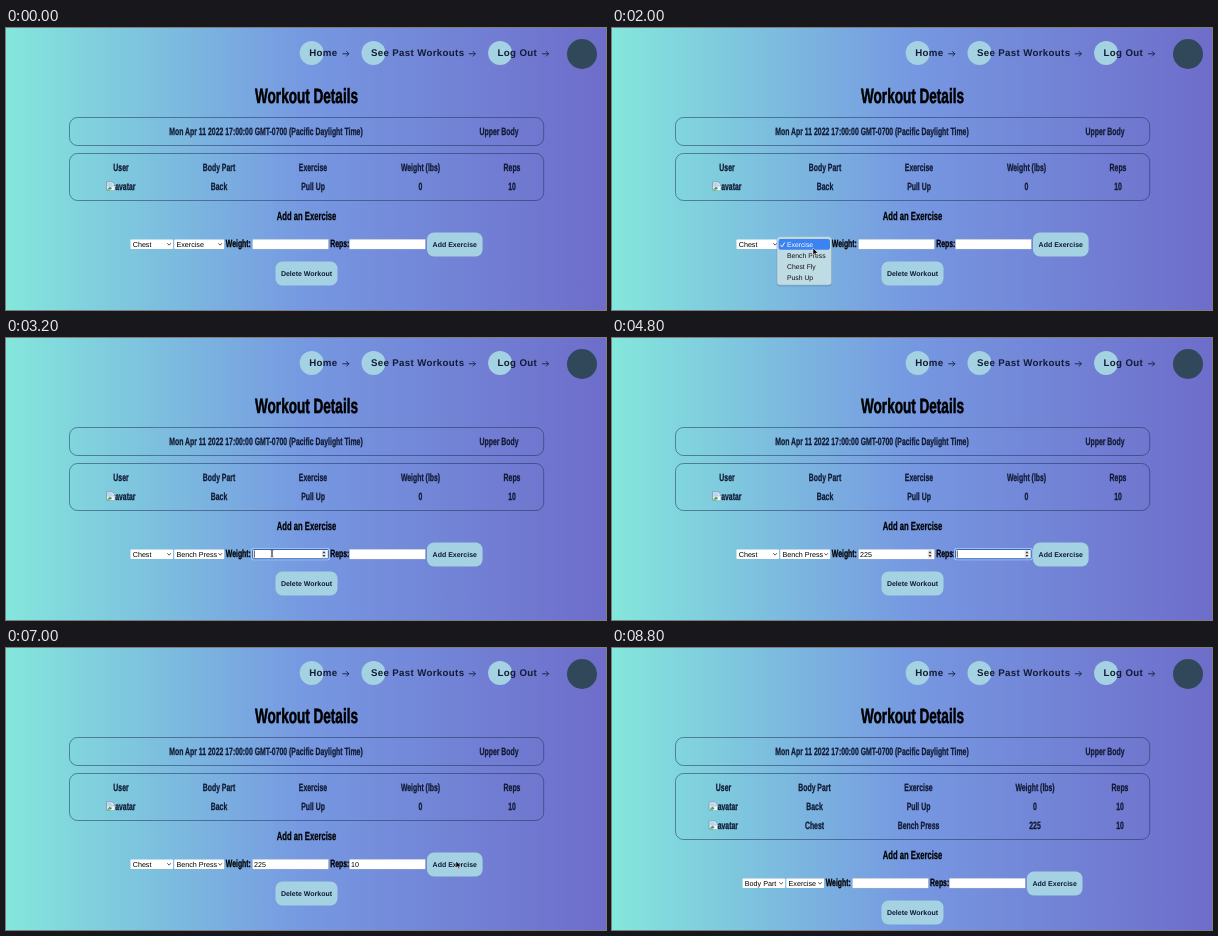
Recreate the animation shown at these times as an HTML page. Size 600x282 px, loop 8900 ms.

```html
<!DOCTYPE html>
<html lang="en">
<head>
<meta charset="utf-8">
<title>Workout Details</title>
<style>
  html, body { margin: 0; width: 100%; height: 100%; overflow: hidden; }
  body { background: linear-gradient(to right, #84e7dc, #7698e1 50%, #6e6dca); }
  svg { display: block; width: 100%; height: 100%; }
  text { font-family: "Liberation Sans", Arial, sans-serif; fill: #000; white-space: pre; text-rendering: geometricPrecision; }
  .narrow { font-weight: bold; font-size: 10.5px; stroke: #000; stroke-width: .3; }
  .cell { fill: #121b35; stroke: #121b35; }
  .title { font-size: 20.7px; stroke-width: .6; }
  .subtitle { font-size: 11.7px; }
  .nav { font-weight: bold; font-size: 9.7px; letter-spacing: .34px; fill: #121b35; }
  .button { font-weight: bold; font-size: 7px; fill: #101a33; text-anchor: middle; }
  .control { font-size: 7.2px; }
  .value { font-size: 7.1px; }
  .option { font-size: 6.8px; }
  .soft { fill: #a4d2e3; }
  .frame { fill: none; stroke: #1c2f55; stroke-width: .6; stroke-opacity: .85; }
  .line { fill: none; stroke: #17213d; stroke-width: .9; }
</style>
</head>
<body>
<svg id="stage" viewBox="0 0 600 282" preserveAspectRatio="none"></svg>
<script>
const LOOP = 8900, STEP = 100;
const SUBMITTED = 7100;

// Condensed display face: one width factor for every heading and cell.
const narrow = (x, y, str, cls = 'cell', anchor = 'middle') =>
  `<text class="narrow ${cls}" text-anchor="${anchor}" transform="translate(${x} ${y}) scale(.655 1)">${str}</text>`;
const text = (x, y, str, cls, extra = '') => `<text x="${x}" y="${y}" class="${cls}" ${extra}>${str}</text>`;
const rect = (x, y, w, h, r, attrs) => `<rect x="${x}" y="${y}" width="${w}" height="${h}" rx="${r}" ${attrs}/>`;

const navLink = (x, label, arrowX) => `
  <circle class="soft" cx="${x + 2.5}" cy="25" r="12"/>
  ${text(x, 28.3, label, 'nav')}
  <path class="line" d="M${arrowX} 25.8h6.6m-2.6-2.6l2.6 2.6l-2.6 2.6"/>`;

const avatar = (x, y) => `
  <g transform="translate(${x - 14.8} ${y - 8.6})">
    <path d="M.4.4h5.4l2.6 2.5v5.8h-8z" fill="#e9f1fb" stroke="#7d8794" stroke-width=".7"/>
    <path d="M1 1h4.6v2.2h2.2v2h-6.8z" fill="#b9d3f6"/>
    <path d="M1 8.2l2.6-3l4 3z" fill="#54a548"/>
    <path d="M8.4 4.4l-4.4 4.4h4.4z" fill="#f4f7fb"/>
  </g>
  ${narrow(x + 4.3, y, 'avatar')}`;

const table = (cols, rows) => {
  const headings = ['User', 'Body Part', 'Exercise', 'Weight (lbs)', 'Reps'];
  const body = rows.map((row, i) => {
    const y = 162 + 19 * i;
    return avatar(cols[0], y) + row.map((v, c) => narrow(cols[c + 1], y, v)).join('');
  });
  return rect(63.5, 125.5, 474.2, 28 + 19 * rows.length, 8, 'class="frame"')
    + headings.map((h, c) => narrow(cols[c], 143, h)).join('') + body.join('');
};

const select = (x, w, label, id = '') => rect(x, 211.5, w, 9.6, .8, 'fill="#fff"')
  + text(x + 2.2, 218.9, label, 'control', id)
  + `<path d="M${x + w - 5.8} 215.2l1.8 2l1.8-2" fill="none" stroke="#333" stroke-width=".8"/>`;

const input = x => rect(x, 211.2, 76, 9.9, 0, 'fill="#fff" stroke="#8f9bb0" stroke-width=".3"');

const button = (x, y, w, label) => rect(x, y, w, 24, 7, 'class="soft"')
  + text(x + w / 2, y + 14.3, label, 'button');

const form = (x, part, exerciseWidth, id) => {
  const after = x + 43.7 + exerciseWidth;
  return narrow(300.5, 192, 'Add an Exercise', 'subtitle')
    + select(x, 42.6, part) + select(x + 43.7, exerciseWidth, 'Exercise', id)
    + narrow(after + 1.6, 219, 'Weight:', '', 'start') + input(after + 28.3)
    + narrow(after + 106, 219, 'Reps:', '', 'start') + input(after + 125.2)
    + button(after + 202.8, 204.5, 55.6, 'Add Exercise')
    + button(269.5, 233.5, 62, 'Delete Workout');
};

const focusable = (id, x) => `
  <g id="${id}Ring">
    ${rect(x - .6, 210.6, 77.2, 11, 1.8, 'fill="#fff" stroke="#a9ccf7" stroke-width="1.4"')}
    ${rect(x + .2, 211.4, 75.6, 9.4, 1, 'fill="#fff" stroke="#1f55b4" stroke-width="1"')}
  </g>
  <g id="${id}Spin">
    ${rect(x + 69.2, 211.9, 4.6, 8.4, 1.4, 'fill="#e6e6e8"')}
    <path d="M${x + 70} 215.2l1.5-1.9l1.5 1.9zM${x + 70} 217l1.5 1.9l1.5-1.9z" fill="#333"/>
  </g>
  ${text(x + 1.6, 218.7, '', 'value', `id="${id}Text"`)}
  <path id="${id}Caret" d="M0 212.6v7" stroke="#111" stroke-width=".6"/>`;

const options = ['Exercise', 'Bench Press', 'Chest Fly', 'Push Up'];
const menu = `<g id="menu">
  ${rect(164.6, 209.6, 55.4, 49, 3.5, 'fill="#1c2c50" opacity=".16"')}
  ${rect(165, 208.6, 54.6, 48.4, 3, 'fill="#bfdbe3" stroke="#8fa9bd" stroke-width=".5"')}
  ${rect(166.6, 0, 51.4, 10.8, 2, 'id="highlight" fill="#3b83f3"')}
  <path id="check" d="M168.6 216.8l1.5 2l2.6-4.3" fill="none" stroke-width=".9"/>
  ${options.map((o, i) => text(175, 219 + 11 * i, o, 'option', `data-row="${i}"`)).join('')}
</g>`;

const pointer = `
  <path id="arrow" d="M0 0v7l1.6-1.5l1.1 2.5l1.1-.5l-1.1-2.4h2.2z" fill="#000" stroke="#fff" stroke-width=".5"/>
  <path id="beam" d="M-1.4-3.4q1.4 0 1.4 1v4.8q0 1-1.4 1M1.4-3.4q-1.4 0-1.4 1v4.8q0 1 1.4 1" fill="none" stroke="#222" stroke-width=".7"/>`;

const stage = document.getElementById('stage');
stage.innerHTML = `
  ${navLink(303.2, 'Home', 336.3)}
  ${navLink(365, 'See Past Workouts', 462.8)}
  ${navLink(491.6, 'Log Out', 536)}
  <circle cx="576" cy="26" r="15" fill="#30485a"/>
  ${narrow(300.5, 74.6, 'Workout Details', 'title')}
  ${rect(63.5, 89.5, 474.2, 28, 8, 'class="frame"')}
  ${narrow(260, 107, 'Mon Apr 11 2022 17:00:00 GMT-0700 (Pacific Daylight Time)')}
  ${narrow(493, 107, 'Upper Body')}
  <g id="before">
    ${table([115, 213, 307, 414.5, 506], [['Back', 'Pull Up', 0, 10]])}
    ${form(124.5, 'Chest', 50, 'id="exercise"')}
    ${focusable('weight', 246.5)}
    ${focusable('reps', 343.4)}
    ${menu}
  </g>
  <g id="after">
    ${table([111.5, 202.5, 306.5, 423, 508], [['Back', 'Pull Up', 0, 10], ['Chest', 'Bench Press', 225, 10]])}
    <g transform="translate(0 19)">${form(130.6, 'Body Part', 37.8)}</g>
  </g>
  ${pointer}`;

const el = id => document.getElementById(id);
const show = (id, on) => el(id).setAttribute('visibility', on ? 'inherit' : 'hidden');
const within = (t, from, to) => t >= from && t < to;

// Each stretch of visible pointer travel: [time, x, y].
const travels = [
  [[100, 262, 261], [800, 197, 215], [1600, 198, 215], [2000, 201, 220], [2300, 204, 227],
   [2500, 204, 227], [3000, 266, 215.5], [3800, 266, 215.5]],
  [[5500, 266, 215.5], [5900, 433, 207.5], [6400, 450, 213], [7400, 450, 213], [8000, 466, 258], [8100, 466, 258]]
];

function pointerAt(t) {
  const path = travels.find(p => within(t, p[0][0], p[p.length - 1][0]));
  if (!path) return null;
  const i = path.findIndex(p => p[0] > t);
  const [t0, x0, y0] = path[i - 1], [t1, x1, y1] = path[i];
  const u = (t - t0) / (t1 - t0), k = u * u * (3 - 2 * u);
  return [x0 + (x1 - x0) * k, y0 + (y1 - y0) * k];
}

function field(id, x, t, focus, blur, keys, hover) {
  const focused = within(t, focus, blur);
  const typed = keys.filter(([at]) => t >= at);
  const value = typed.map(([, key]) => key).join('');
  const last = typed.length ? typed[typed.length - 1][0] : focus;
  show(id + 'Ring', focused);
  show(id + 'Spin', focused || hover);
  show(id + 'Caret', focused && (t - last) % 1000 < 500);
  el(id + 'Caret').setAttribute('transform', `translate(${x + 2 + value.length * 3.9} 0)`);
  el(id + 'Text').textContent = value;
}

function render(t) {
  show('before', t < SUBMITTED);
  show('after', t >= SUBMITTED);

  el('exercise').textContent = t < 2500 ? 'Exercise' : 'Bench Press';
  const row = t < 2200 ? 0 : 1;
  show('menu', within(t, 1200, 2500));
  el('highlight').setAttribute('y', 211 + 11 * row);
  el('check').setAttribute('stroke', row ? '#111' : '#fff');
  document.querySelectorAll('[data-row]').forEach((o, i) => o.style.fill = i === row ? '#fff' : '#111');

  field('weight', 246.5, t, 3000, 4600, [[3900, '2'], [4100, '2'], [4300, '5']], within(t, 2900, 5600));
  field('reps', 343.4, t, 4600, 6800, [[5000, '1'], [5200, '0']], false);

  const at = pointerAt(t);
  const beam = within(t, 2900, 5600);
  show('arrow', at && !beam);
  show('beam', at && beam);
  if (at) el(beam ? 'beam' : 'arrow').setAttribute('transform', `translate(${at})`);
}

const start = performance.now();
function tick() {
  const t = (performance.now() - start) % LOOP;
  render(Math.floor(t / STEP) * STEP);
  requestAnimationFrame(tick);
}
tick();
</script>
</body>
</html>
```
